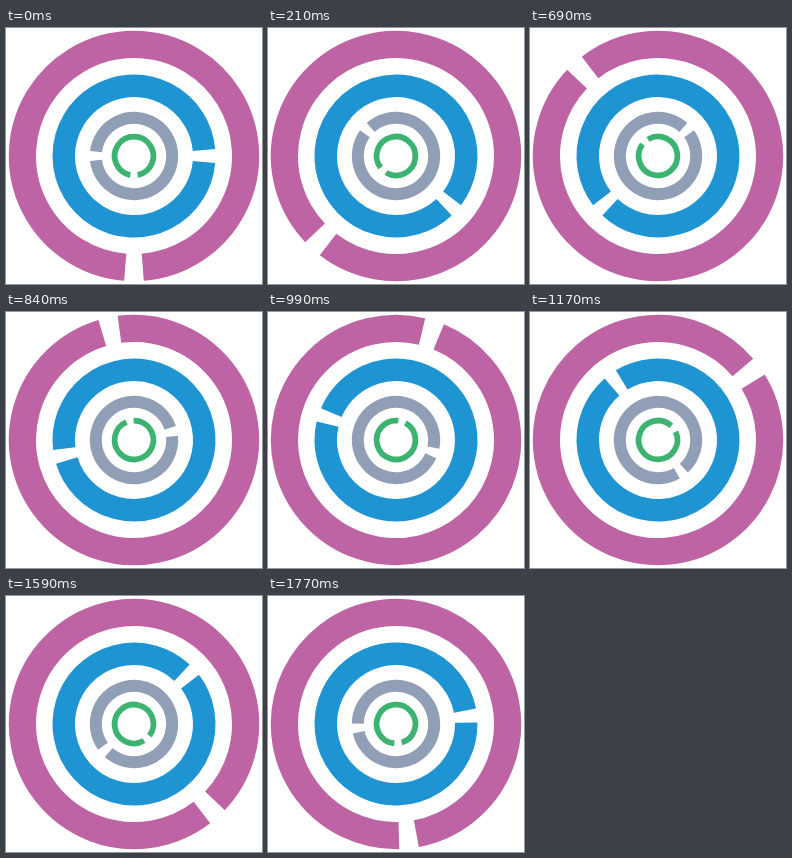
An HTML page that plays this animation: 256 by 256 pixels, repeating every 1800 ms.

```html
<!DOCTYPE html>
<html lang="en">
<head>
<meta charset="utf-8">
<title>Rotating rings</title>
<style>
  html, body { margin: 0; width: 100%; height: 100%; overflow: hidden; background: #fff; }
  svg { display: block; width: 100vw; height: 100vh; }
</style>
</head>
<body>
<svg viewBox="0 0 256 256"><g id="rings" fill="none"></g></svg>
<script>
const LOOP = 1800, STEP = 30, CENTER = 128;
const group = document.getElementById('rings');

// Angles in degrees, clockwise from the right; halfGap is half the opening.
const rings = [
  { outer: 125.2, inner: 98, gapAt: 90, halfGap: 4.5, color: '#be64a5' },
  { outer: 81.5, inner: 59, gapAt: 0, halfGap: 4.9, color: '#1e94d2' },
  { outer: 44.2, inner: 32.2, gapAt: 180, halfGap: 6.5, color: '#919fb6' },
  { outer: 22.3, inner: 16.5, gapAt: 90, halfGap: 11, color: '#3cb371' }
];

function point(radius, degrees) {
  const a = degrees * Math.PI / 180;
  return `${CENTER + radius * Math.cos(a)} ${CENTER + radius * Math.sin(a)}`;
}

for (const { outer, inner, gapAt, halfGap, color } of rings) {
  const radius = (outer + inner) / 2;
  const path = document.createElementNS('http://www.w3.org/2000/svg', 'path');
  path.setAttribute('d',
    `M${point(radius, gapAt + halfGap)}A${radius} ${radius} 0 1 1 ${point(radius, gapAt - halfGap)}`);
  path.setAttribute('stroke', color);
  path.setAttribute('stroke-width', outer - inner);
  group.append(path);
}

function render(time) {
  const stepped = Math.floor((time % LOOP) / STEP) * STEP;
  group.setAttribute('transform', `rotate(${360 * stepped / LOOP} ${CENTER} ${CENTER})`);
}

const start = performance.now();
function tick() {
  render(performance.now() - start);
  requestAnimationFrame(tick);
}
render(0);
requestAnimationFrame(tick);
</script>
</body>
</html>
```
